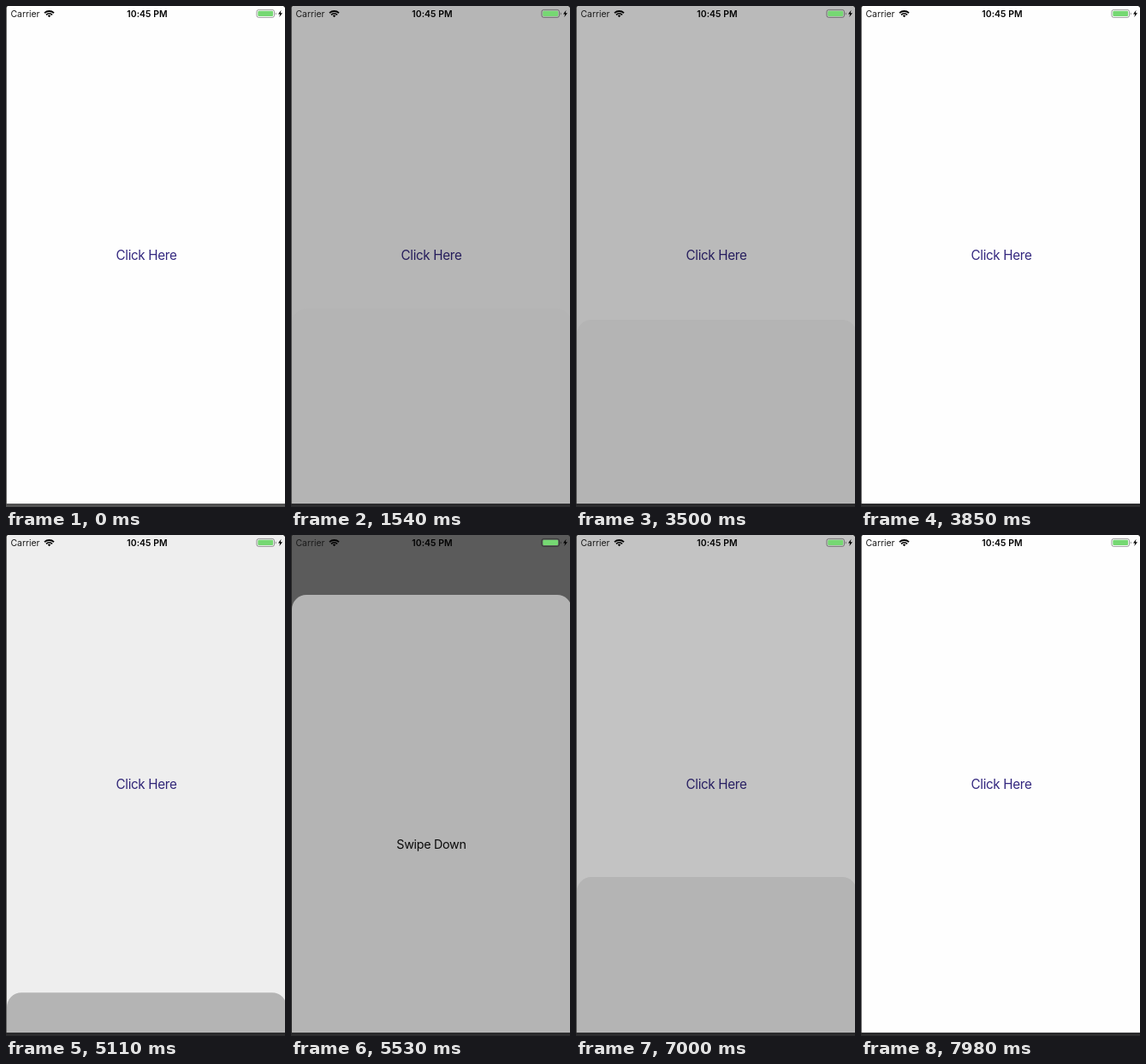
Write an HTML page that moves like this. It is 326 by 586 pixels and loops after 8.61 s.

```html
<!DOCTYPE html>
<html lang="en">
<head>
<meta charset="utf-8">
<title>Swipe-down sheet</title>
<style>
  html, body { margin: 0; width: 100%; height: 100%; overflow: hidden; background: #fff; }
  svg { display: block; width: 326px; height: 586px; }
  text { font-family: Inter, Roboto, "Liberation Sans", sans-serif; }
</style>
</head>
<body>
<svg viewBox="0 0 326 586">
  <rect width="326" height="586" fill="#fefefe"/>
  <text x="164" y="296.6" font-size="15.2" letter-spacing="-.33" text-anchor="middle" fill="#33277f">Click Here</text>
  <rect id="dim" width="326" height="586" opacity="0"/>

  <g id="sheet">
    <rect x="1" width="327" height="620" rx="17" fill="#b4b4b4"/>
    <text x="164" y="296.5" font-size="14.35" letter-spacing="-.3" text-anchor="middle" fill="#0a0a0a">Swipe Down</text>
  </g>

  <!-- status bar -->
  <text x="5.5" y="12.8" font-size="10.4" fill="#1c1c1c">Carrier</text>
  <g fill="none" stroke="#000" stroke-width="1.8">
    <path d="M45 8.2a8 8 0 0 1 11 0M47 10.3a5 5 0 0 1 7 0"/>
    <path d="M50.5 13.2l-1.8-1.9a2.6 2.6 0 0 1 3.6 0z" fill="#000" stroke="none"/>
  </g>
  <text x="165" y="12.8" font-size="10.4" font-weight="600" letter-spacing=".1" text-anchor="middle">10:45 PM</text>
  <rect x="292.9" y="4.4" width="20.6" height="9" rx="2.4" fill="none" stroke="#000" stroke-opacity=".42" stroke-width=".9"/>
  <rect x="294.3" y="5.8" width="17.8" height="6.2" rx="1.2" fill="#76d873"/>
  <path d="M314.8 7.4a1.6 1.6 0 0 1 0 3z" fill-opacity=".45"/>
  <path d="M321.6 4.8l-3.6 4.6h2.2l-.9 3.6 3.7-4.8h-2.3z"/>

  <!-- window edge -->
  <rect width="1" height="582" fill-opacity=".55"/>
  <path d="M0 0h2L0 2zM326 0h-2l2 2z" fill="#222"/>
  <rect id="bar" y="582" width="326" height="4"/>
</svg>
<script>
  const LOOP = 8610, STEP = 70;
  const OPEN = 70, CLOSED = 586, MAX_DIM = 0.64;
  const byId = id => document.getElementById(id);
  const dim = byId('dim'), sheet = byId('sheet'), bar = byId('bar');

  const easeInOut = x => x * x * (3 - 2 * x);
  const easeOut = power => x => 1 - (1 - x) ** power;
  const speedUp = x => 0.45 * x + 0.55 * x ** 8;

  // start, end, sheet top at start, sheet top at end, easing
  const moves = [
    [1300, 1815, CLOSED, OPEN, easeInOut],
    [2620, 3370, OPEN, 300, easeInOut],
    [3450, 3850, 300, CLOSED, easeOut(2)],
    [5010, 5525, CLOSED, OPEN, easeInOut],
    [6050, 7000, OPEN, 400, speedUp],
    [7000, 7975, 400, CLOSED, easeOut(3)]
  ];

  function sheetTop(t) {
    let top = CLOSED;
    for (const [start, end, from, to, ease] of moves) {
      if (t < start) break;
      top = from + (to - from) * ease(Math.min(1, (t - start) / (end - start)));
    }
    return top;
  }

  function draw(ms) {
    const t = Math.floor((ms % LOOP) / STEP) * STEP;
    const top = sheetTop(t);
    sheet.setAttribute('transform', `translate(0 ${top.toFixed(2)})`);
    dim.setAttribute('opacity', MAX_DIM * (CLOSED - top) / (CLOSED - OPEN));
    bar.setAttribute('fill', t < 1190 ? '#525252' : '#2b2b2d');
  }

  const began = performance.now();
  function tick() {
    draw(performance.now() - began);
    requestAnimationFrame(tick);
  }
  tick();
</script>
</body>
</html>
```
